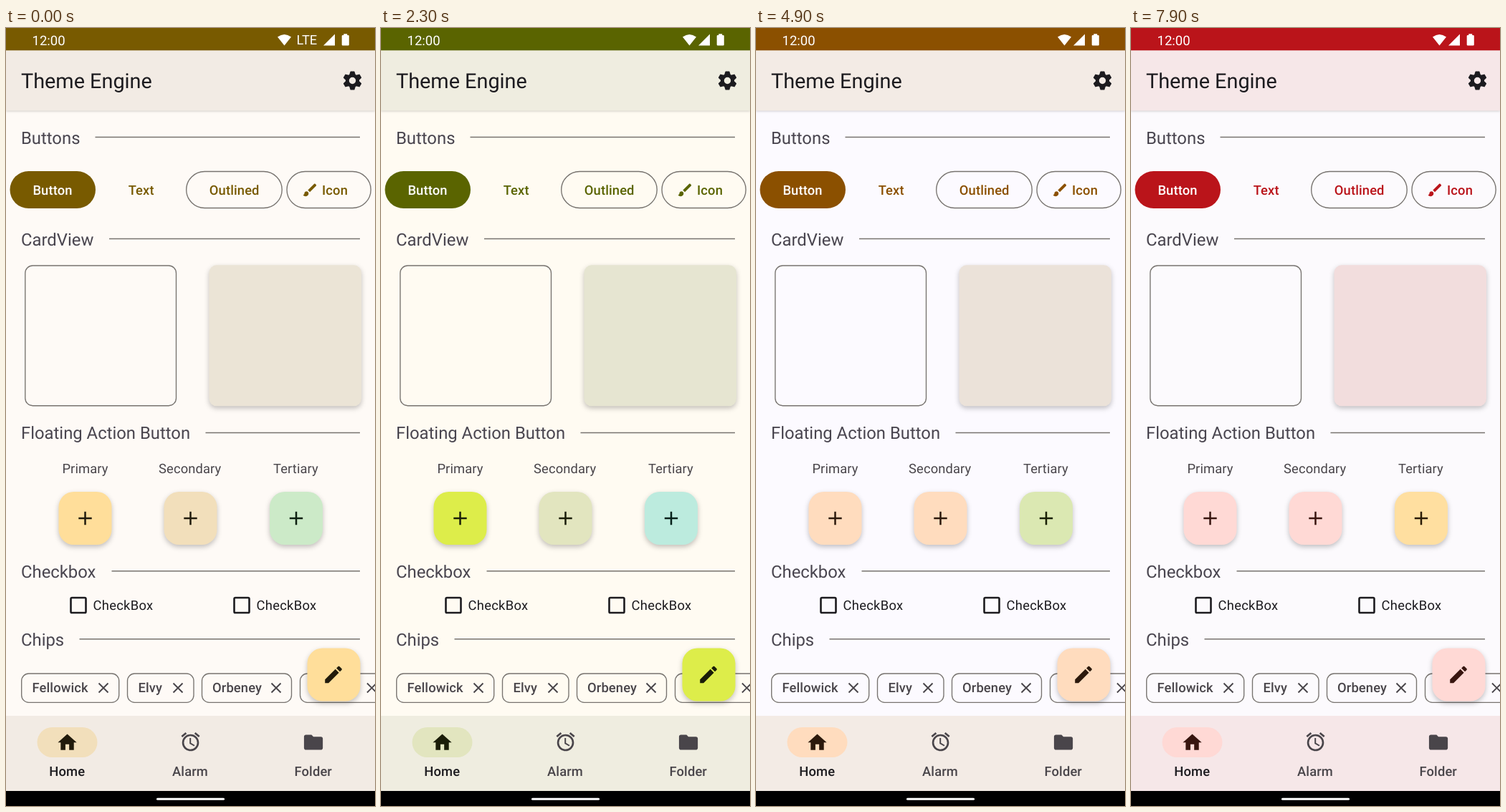
These frames come from a looping animation (515 by 1087 pixels, 8 s). An HTML page:

```html
<!DOCTYPE html>
<html lang="en">
<head>
<meta charset="utf-8">
<title>Theme Engine</title>
<style>
  html, body { margin: 0; width: 100%; height: 100%; overflow: hidden; background: #000; }
  svg {
    display: block; width: 515px; height: 1087px;
    font: 400 18.36px Roboto, sans-serif;
    text-rendering: geometricPrecision;
    animation: theme 8s step-end infinite;
  }
  /* p primary, bg page, bar app and nav bar, card, c1-c3 containers, i1/i3 icons on them */
  @keyframes theme {
    0%    { --p: #785a00; --bg: #fefaf6; --bar: #f2ebe4; --card: #ebe4d6; --c1: #ffde9a; --c2: #f2dfbb; --c3: #cceac8; --i1: #211b0c; --i3: #0c1f10; }
    12.5% { --p: #006496; --bg: #fcfbff; --bar: #e6eef6; --card: #dce6f0; --c1: #c8e5ff; --c2: #d2e4f6; --c3: #e9dcfc; --i1: #0c1c2b; --i3: #201530; }
    25%   { --p: #5a6400; --bg: #fffbf2; --bar: #efede0; --card: #e6e5d1; --c1: #dded4a; --c2: #e2e5bf; --c3: #bcebde; --i1: #1a1d08; --i3: #06201a; }
    50%   { --p: #8b5000; --bg: #fcfaff; --bar: #f3ebe5; --card: #ebe2d9; --c1: #ffdcbe; --c2: #ffdcbe; --c3: #dbe8b2; --i1: #2c190c; --i3: #171e04; }
    62.5% { --p: #bc0049; --bg: #fcfafe; --bar: #f6e7ec; --card: #f3d9e1; --c1: #f8d8df; --c2: #f8d8df; --c3: #ffdcb5; --i1: #361518; --i3: #2b1708; }
    75%   { --p: #6750a4; --bg: #fefaff; --bar: #f2eaf7; --card: #e8e0f0; --c1: #eadcff; --c2: #eadcff; --c3: #f5d9e0; --i1: #22205a; --i3: #45131c; }
    87.5% { --p: #ba141a; --bg: #fcfafd; --bar: #f6e7e8; --card: #f2dddd; --c1: #ffd9d5; --c2: #ffd9d5; --c3: #ffdfa0; --i1: #38150f; --i3: #291a06; }
  }
  .lte  { animation: lte 8s step-end infinite; }
  .wifi { animation: wifi 8s step-end infinite; }
  @keyframes lte  { 0% { visibility: visible; } 12.5%, 100% { visibility: hidden; } }
  @keyframes wifi { 0% { transform: translateX(-42px); } 12.5%, 100% { transform: none; } }

  .p { fill: var(--p); }
  .bar { fill: var(--bar); }
  .c1 { fill: var(--c1); }
  .c2 { fill: var(--c2); }
  .c3 { fill: var(--c3); }
  .on1 { fill: var(--i1); stroke: var(--i1); }
  .on3 { fill: var(--i3); stroke: var(--i3); }
  .ink { fill: #1c1b1f; }
  .soft { fill: #49454a; }
  .mid { text-anchor: middle; }
  .med { font-weight: 500; letter-spacing: .13px; }
  .head { font-size: 23.85px; fill: #49454f; }
  .line { fill: none; stroke: #77736f; stroke-width: 1.35; }
  .lift { filter: drop-shadow(0 3px 3.5px rgba(0, 0, 0, .24)); }
  .cross { fill: none; stroke: #49454a; stroke-width: 1.9; }
  .box { fill: none; stroke: #1c1b1f; stroke-width: 2.6; }
</style>
</head>
<body>
<svg viewBox="0 0 515 1087">
  <defs>
    <path id="home" stroke="none" d="M10 20v-6h4v6h5v-8h3L12 3 2 12h3v8z"/>
    <path id="folder" d="M10 4H4c-1.1 0-2 .9-2 2v12c0 1.1.9 2 2 2h16c1.1 0 2-.9 2-2V8c0-1.1-.9-2-2-2h-8z"/>
    <path id="pencil" stroke="none" d="M3 17.25V21h3.75L17.81 9.94l-3.75-3.75zM20.71 7.04c.39-.39.39-1.02 0-1.41l-2.34-2.34c-.39-.39-1.02-.39-1.41 0l-1.83 1.83 3.75 3.75z"/>
    <path id="brush" d="M7 14c-1.66 0-3 1.34-3 3 0 1.31-1.16 2-2 2 .92 1.22 2.49 2 4 2 2.21 0 4-1.79 4-4 0-1.66-1.34-3-3-3zm13.71-9.37l-1.34-1.34c-.39-.39-1.02-.39-1.41 0L9 12.25 11.75 15l8.96-8.96c.39-.39.39-1.02 0-1.41z"/>
    <g id="alarm" fill="none" stroke="#49454a">
      <circle cx="12" cy="13" r="8" stroke-width="2"/>
      <path stroke-width="1.5" d="M11.75 8v5.6l4.4 2.6"/>
      <path stroke-width="2" d="M2.7 6.5l4.6-3.9M21.3 6.5l-4.6-3.9"/>
    </g>
    <path id="tooth" d="M-3.5-5.5L-2.3-9.5Q-2.2-10-1.8-10H1.8Q2.2-10 2.3-9.5L3.5-5.5z"/>
    <g id="gear">
      <circle r="5.45" fill="none" stroke="#1c1b1f" stroke-width="3.7"/>
      <use href="#tooth"/>
      <use href="#tooth" transform="rotate(60)"/>
      <use href="#tooth" transform="rotate(120)"/>
      <use href="#tooth" transform="rotate(180)"/>
      <use href="#tooth" transform="rotate(240)"/>
      <use href="#tooth" transform="rotate(300)"/>
    </g>
    <rect id="fab" width="74" height="74" rx="21"/>
    <path id="plus" fill="none" stroke-width="2.5" d="M-9.2 0H9.2M0-9.2V9.2"/>
    <path id="x" d="M-6.5-6.5L6.5 6.5M6.5-6.5L-6.5 6.5"/>
    <rect id="tick" x="-10.5" y="-10.5" width="21" height="21" rx="1.6"/>
  </defs>

  <rect width="515" height="1087" fill="var(--bg)"/>

  <!-- app bar -->
  <rect class="bar" y="31" width="515" height="84.5" style="filter: drop-shadow(0 1px 1.5px rgba(0, 0, 0, .17))"/>
  <text class="ink" x="21" y="84" font-size="28.84">Theme Engine</text>
  <use class="ink" href="#gear" transform="translate(483.5 73.5) scale(1.311)"/>

  <!-- status bar -->
  <rect class="p" width="515" height="31.3"/>
  <g fill="#fff">
    <text x="36.5" y="24" font-size="18.5">12:00</text>
    <path class="wifi" d="M430.5 24.5L421 12.6Q430.500 5.400 440 12.600z"/>
    <text class="lte" x="405.500" y="23" font-size="18.3">LTE</text>
    <path d="M459 8.500V24.500H443z"/>
    <path d="M471.300 10V8.200H476.200V10H477.500Q478.800 10 478.800 11.300V23.300Q478.800 24.600 477.500 24.600H470Q468.700 24.600 468.700 23.300V11.300Q468.700 10 470 10z"/>
  </g>

  <!-- section heads -->
  <g class="head">
    <text x="21" y="161.500">Buttons</text>
    <text x="21" y="303.500">CardView</text>
    <text x="21" y="574">Floating Action Button</text>
    <text x="21" y="768">Checkbox</text>
    <text x="21" y="863">Chips</text>
  </g>
  <path class="line" d="M124.500 152.500H494M144 294.500H494M278.500 565.500H494M147.500 758.700H494M102.500 853.700H494"/>

  <!-- buttons -->
  <rect class="p" x="5.500" y="200" width="119.500" height="52" rx="26"/>
  <rect class="line" x="251.700" y="200.500" width="133.500" height="51" rx="25.500"/>
  <rect class="line" x="392" y="200.500" width="117.200" height="51" rx="25.500"/>
  <g class="p med">
    <text class="mid" x="65" y="233" fill="#fff">Button</text>
    <text class="mid" x="188.700" y="233">Text</text>
    <text class="mid" x="318.700" y="233">Outlined</text>
    <text x="441" y="233">Icon</text>
    <use href="#brush" transform="translate(412.500 214.500) scale(.983)"/>
  </g>

  <!-- cards -->
  <rect class="line" x="26.800" y="332" width="210.700" height="195.700" rx="10.500"/>
  <rect class="lift" x="283.500" y="331.300" width="212.500" height="197" rx="10.500" fill="var(--card)"/>

  <!-- floating buttons -->
  <g class="soft mid" letter-spacing=".1">
    <text x="110.500" y="622">Primary</text>
    <text x="256.700" y="622">Secondary</text>
    <text x="404.500" y="622">Tertiary</text>
  </g>
  <use class="c1 lift" href="#fab" x="73.500" y="648"/>
  <use class="c2 lift" href="#fab" x="220.500" y="648"/>
  <use class="c3 lift" href="#fab" x="368" y="648"/>
  <use class="on1" href="#plus" x="110.500" y="685"/>
  <use class="on1" href="#plus" x="257.500" y="685"/>
  <use class="on3" href="#plus" x="405" y="685"/>

  <!-- checkboxes -->
  <use class="box" href="#tick" x="101" y="806.500"/>
  <use class="box" href="#tick" x="329" y="806.500"/>
  <g class="ink" letter-spacing=".3">
    <text x="121.500" y="813">CheckBox</text>
    <text x="349.500" y="813">CheckBox</text>
  </g>

  <!-- chips -->
  <g class="line">
    <rect x="21.700" y="902" width="136" height="40.300" rx="10"/>
    <rect x="169.500" y="902" width="92.500" height="40.300" rx="10"/>
    <rect x="273.500" y="902" width="125" height="40.300" rx="10"/>
    <rect x="410.500" y="902" width="125" height="40.300" rx="10"/>
  </g>
  <g class="soft med">
    <text x="36.500" y="928.300">Fellowick</text>
    <text x="184.500" y="928.300">Elvy</text>
    <text x="288" y="928.300">Orbeney</text>
  </g>
  <g class="cross">
    <use href="#x" x="136" y="922"/>
    <use href="#x" x="240" y="922"/>
    <use href="#x" x="377" y="922"/>
    <use href="#x" x="510.500" y="922"/>
  </g>
  <use class="c1 lift" href="#fab" x="420.500" y="866.500"/>
  <use class="on1" href="#pencil" transform="translate(441.300 887.700) scale(1.311)"/>

  <!-- bottom navigation -->
  <rect class="bar" y="961" width="515" height="105"/>
  <rect class="c2" x="43.500" y="977" width="84" height="42" rx="21"/>
  <use class="on1" href="#home" transform="translate(69.800 982.500) scale(1.311)"/>
  <use href="#alarm" transform="translate(241.800 981.500) scale(1.311)"/>
  <use class="soft" href="#folder" transform="translate(413.300 982.300) scale(1.311)"/>
  <g class="soft med mid">
    <text class="ink" x="85.300" y="1045">Home</text>
    <text x="257" y="1045">Alarm</text>
    <text x="428.700" y="1045">Folder</text>
  </g>
  <rect y="1066" width="515" height="21"/>
  <rect x="210" y="1075.800" width="95" height="3" rx="1.500" fill="#fff"/>
</svg>
</body>
</html>
```
